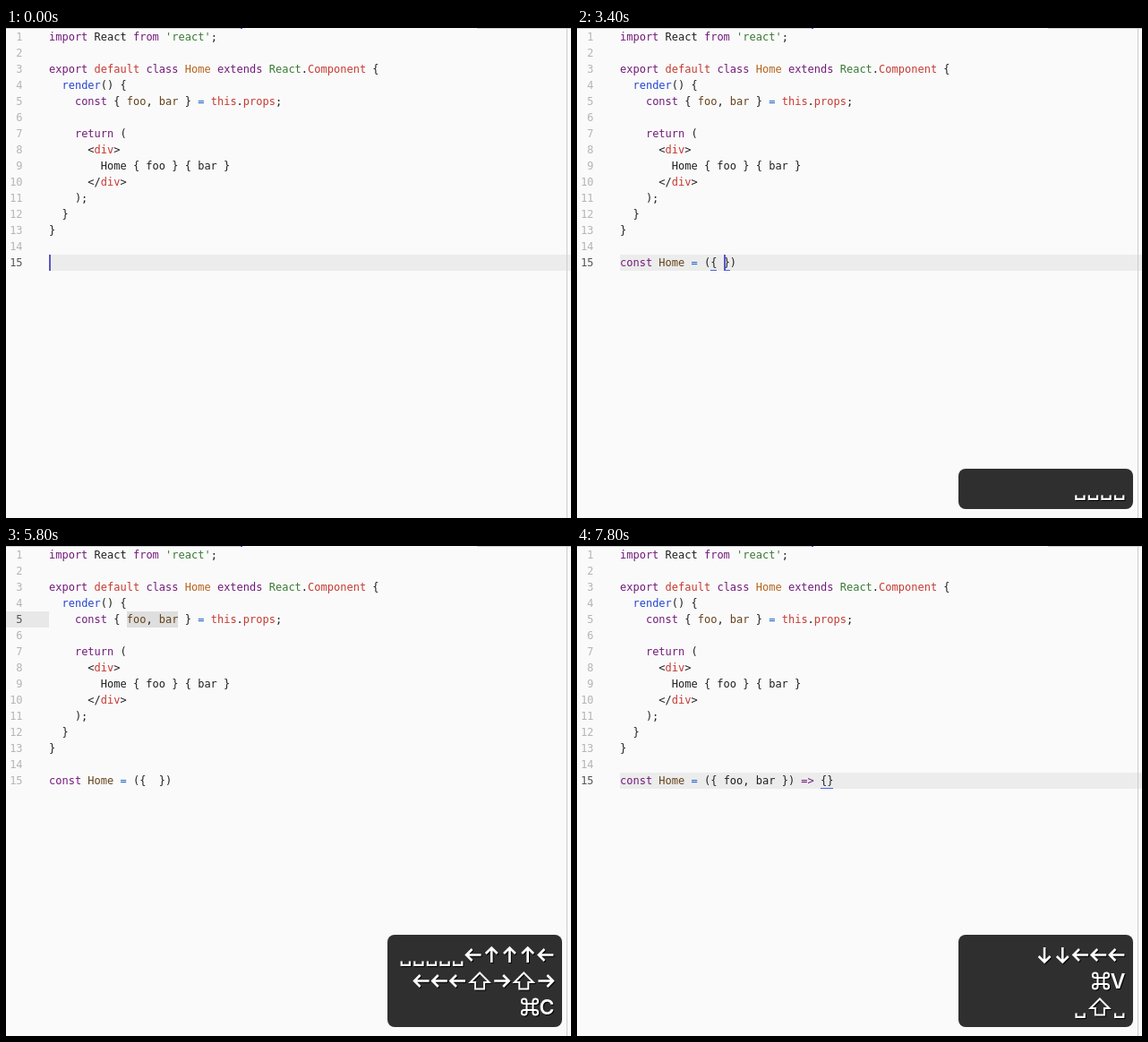
An HTML page for the animation above (8000 ms loop, 631 by 547 pixels).

```html
<!DOCTYPE html>
<html lang="en">
<head>
<meta charset="utf-8">
<title>Editor typing</title>
<style>
  html, body { margin: 0; width: 100%; height: 100%; overflow: hidden; background: #fafafa; }
  #stage { position: relative; width: 631px; height: 547px; overflow: hidden; font: 12px/18px "DejaVu Sans Mono", monospace; color: #202020; }
  #stage div, svg { position: absolute; }
  pre { position: absolute; margin: 0; top: 1px; font: inherit; }
  #code { left: 48px; }
  #gutter { left: 0; width: 18.6px; text-align: right; color: #b5b5b5; }
  #gutter .current { color: #555; }
  #row { left: 48px; right: 0; height: 18px; background: #ececec; }
  #gutterRow { left: 0; width: 48px; height: 18px; background: #e8e8e8; }
  #selection { height: 18px; background: #dedede; }
  #cursor { width: 2px; height: 18px; background: #5b55c8; }
  .match { width: 7.2px; height: 1px; top: 270px; background: #4a66e0; }
  .edge { top: 0; height: 1px; background: #cfcfcf; }
  #accent { left: 262px; top: 0; width: 2px; height: 1px; background: #5b55c8; }
  #guide { left: 626px; top: 0; width: 1px; height: 547px; background: #cdcdcd; }
  svg { left: 0; top: 0; }
  #keys { fill: none; stroke: #fff; stroke-width: 2.6; filter: drop-shadow(1.5px 1.5px .5px #000); }
  #keys text { fill: #fff; stroke: none; font: 600 23px Inter, sans-serif; text-anchor: middle; }
  b { font-weight: normal; }
  .p { color: #721a7a; } .r { color: #c53a32; } .o { color: #b5651d; } .g { color: #397a33; }
  .u { color: #2546d2; } .n { color: #65431a; } .e { color: #1f62c8; }
</style>
</head>
<body>
<div id="stage">
  <div id="row"></div><div id="gutterRow"></div><div id="selection"></div>
  <div class="edge" style="left:0;width:262px"></div><div id="accent"></div>
  <div class="edge" style="left:526px;width:105px"></div>
  <pre id="gutter"></pre>
  <pre id="code"></pre>
  <div id="matches"></div>
  <div id="cursor"></div>
  <div id="guide"></div>
  <svg width="631" height="547">
    <rect id="panel" x="426" width="195" rx="8" fill="#2f2f2f"/>
    <g id="keys"></g>
  </svg>
</div>
<script>
const LOOP = 8000, STEP = 200, LINE = 18, LEFT = 48, CHAR = 7.224;
const $ = id => document.getElementById(id);

// "p:word" colours a word with class p.
const colour = s => s.replace(/\b([prognue]):('?[\w=]+'?)/g, '<b class="$1">$2</b>');
const source = colour(`p:import React p:from g:'react';

p:export r:default p:class o:Home p:extends g:React.r:Component {
  u:render() {
    p:const { n:foo, n:bar } e:= r:this.r:props;

    p:return (
      &lt;r:div>
        Home { foo } { bar }
      &lt;/r:div>
    );
  }
}

`);

const paintTyped = s => s.replace(/const|H\w*|=>|=/g, word =>
  `<b class="${word === '=' ? 'e' : word[0] === 'H' ? 'n' : 'p'}">${word}</b>`);

const key = (width, path, stroke = 2.6) => ({ width, path, stroke });
const KEYS = {
  '_': key(14.6, 'M-4.6 7v4.3h9.2v-4.3', 2.2),
  '<': key(20.2, 'M8.5 0H-7M-1.5-6.5L-8 0l6.5 6.5'),
  '>': key(20.2, 'M-8.5 0H7M1.5-6.5L8 0l-6.5 6.5'),
  '^': key(20.2, 'M0 8.5V-7M-6.5-1.5L0-8l6.5 6.5'),
  'v': key(20.2, 'M0-8.5V7M-6.5 1.5L0 8l6.5-6.5'),
  'S': key(29, 'M0-9L10.5 1.5H5V9H-5V1.5H-10.5z', 2),
  '@': key(20, 'M-3.5-6.3v12.6a2.8 2.8 0 1 1-2.8-2.8h12.6a2.8 2.8 0 1 1-2.8 2.8v-12.6a2.8 2.8 0 1 1 2.8 2.8h-12.6a2.8 2.8 0 1 1 2.8-2.8z', 2),
  'C': key(18), 'V': key(18)
};

// Each entry starts at a step and keeps what it does not mention.
const WALK = '_____<^^^<', PICK = '<<<S>S>', DOWN = 'vv<<<';
const script = [
  [0, { text: '', line: 15, col: 0, match: [], select: 0, keys: '' }],
  [7, { text: 'c', col: 1 }],
  [8, { text: 'co', col: 2 }],
  [9, { text: 'con', col: 3 }],
  [10, { text: 'const', col: 5 }],
  [11, { text: 'const ', col: 6, keys: '_' }],
  [12, { text: 'const H', col: 7 }],
  [13, { text: 'const Hom', col: 9 }],
  [14, { text: 'const Home ', col: 11, keys: '__' }],
  [15, { text: 'const Home = ', col: 13, keys: '___' }],
  [16, { text: 'const Home = ({})', col: 15, match: [14, 15] }],
  [17, { text: 'const Home = ({ })', col: 16, match: [14, 16], keys: '____' }],
  [18, { text: 'const Home = ({  })', col: 17, match: [14, 17], keys: '_____' }],
  [19, { col: 16, match: [], keys: WALK.slice(0, 6) }],
  [20, { line: 14, col: 0, keys: WALK.slice(0, 7) }],
  [21, { line: 6, keys: WALK.slice(0, 8) }],
  [22, { keys: WALK.slice(0, 9) }],
  [23, { line: 5, col: 30, keys: WALK }],
  [24, { col: 17, keys: `${WALK}|<<` }],
  [25, { col: 12, keys: `${WALK}|<<<` }],
  [26, { select: 3, keys: `${WALK}|<<<S>` }],
  [27, { select: 8, keys: `${WALK}|${PICK}` }],
  [29, { keys: `${WALK}|${PICK}|@C` }],
  [30, { line: 15, col: 19, select: 0, match: [13, 18], keys: `${WALK}|${PICK}|@C|vv` }],
  [31, { col: 17, match: [14, 17], keys: `${WALK}|${PICK}|@C|vv<<` }],
  [32, { col: 16, match: [], keys: `${WALK}|${PICK}|@C|${DOWN}` }],
  [34, { text: 'const Home = ({ foo, bar })', col: 24, keys: `@C|${DOWN}|@V` }],
  [35, { text: 'const Home = ({ foo, bar }) ', col: 28, keys: `${DOWN}|@V|_` }],
  [36, { text: 'const Home = ({ foo, bar }) =', col: 29 }],
  [37, { text: 'const Home = ({ foo, bar }) => ', col: 31, keys: `${DOWN}|@V|_S_` }],
  [38, { text: 'const Home = ({ foo, bar }) => {}', col: 32, match: [31, 32] }]
];

const stateAt = step => Object.assign({}, ...script.filter(([at]) => at <= step).map(([, change]) => change));
const cursorOn = step => step < 12 ? step % 2 === 0 : step < 39;
const rowTop = line => 1 + (line - 1) * LINE;
const colLeft = col => LEFT + col * CHAR;
const show = (id, on) => $(id).style.display = on ? '' : 'none';
const place = (id, left, top) => Object.assign($(id).style, { left: left + 'px', top: top + 'px' });

function drawKeys(keys) {
  show('panel', keys);
  const rows = keys.split('|');
  const height = 16 + 29 * rows.length;
  $('panel').setAttribute('y', 537 - height);
  $('panel').setAttribute('height', height);
  let out = '';
  rows.forEach((row, i) => {
    const y = 514.5 - 29 * (rows.length - 1 - i);
    let x = 613;
    for (const name of [...row].reverse()) {
      const { width, path, stroke } = KEYS[name];
      const mid = x - width / 2;
      out += path
        ? `<path transform="translate(${mid} ${y})" stroke-width="${stroke}" d="${path}"/>`
        : `<text x="${mid}" y="${y + 8.5}">${name}</text>`;
      x -= width;
    }
  });
  $('keys').innerHTML = out;
}

function draw(step) {
  const { text, line, col, match, select, keys } = stateAt(step);
  const top = rowTop(line);
  $('code').innerHTML = source + paintTyped(text);
  $('gutter').innerHTML = Array.from({ length: 15 }, (_, i) =>
    i + 1 === line ? `<b class="current">${line}</b>` : i + 1).join('\n');
  $('matches').innerHTML = match.map(c => `<div class="match" style="left:${colLeft(c)}px"></div>`).join('');
  show('row', !select);
  show('gutterRow', select);
  show('selection', select);
  show('cursor', !select && cursorOn(step));
  place('row', LEFT, top);
  place('gutterRow', 0, top);
  place('selection', colLeft(col), top);
  $('selection').style.width = select * CHAR + 'px';
  place('cursor', Math.round(colLeft(col)), top);
  drawKeys(keys);
}

const start = performance.now();
let shown = -1;
function frame() {
  const time = (performance.now() - start) % LOOP;
  const step = Math.min(LOOP / STEP - 1, Math.floor((time + 10) / STEP));
  if (step !== shown) draw(shown = step);
  requestAnimationFrame(frame);
}
frame();
</script>
</body>
</html>
```
